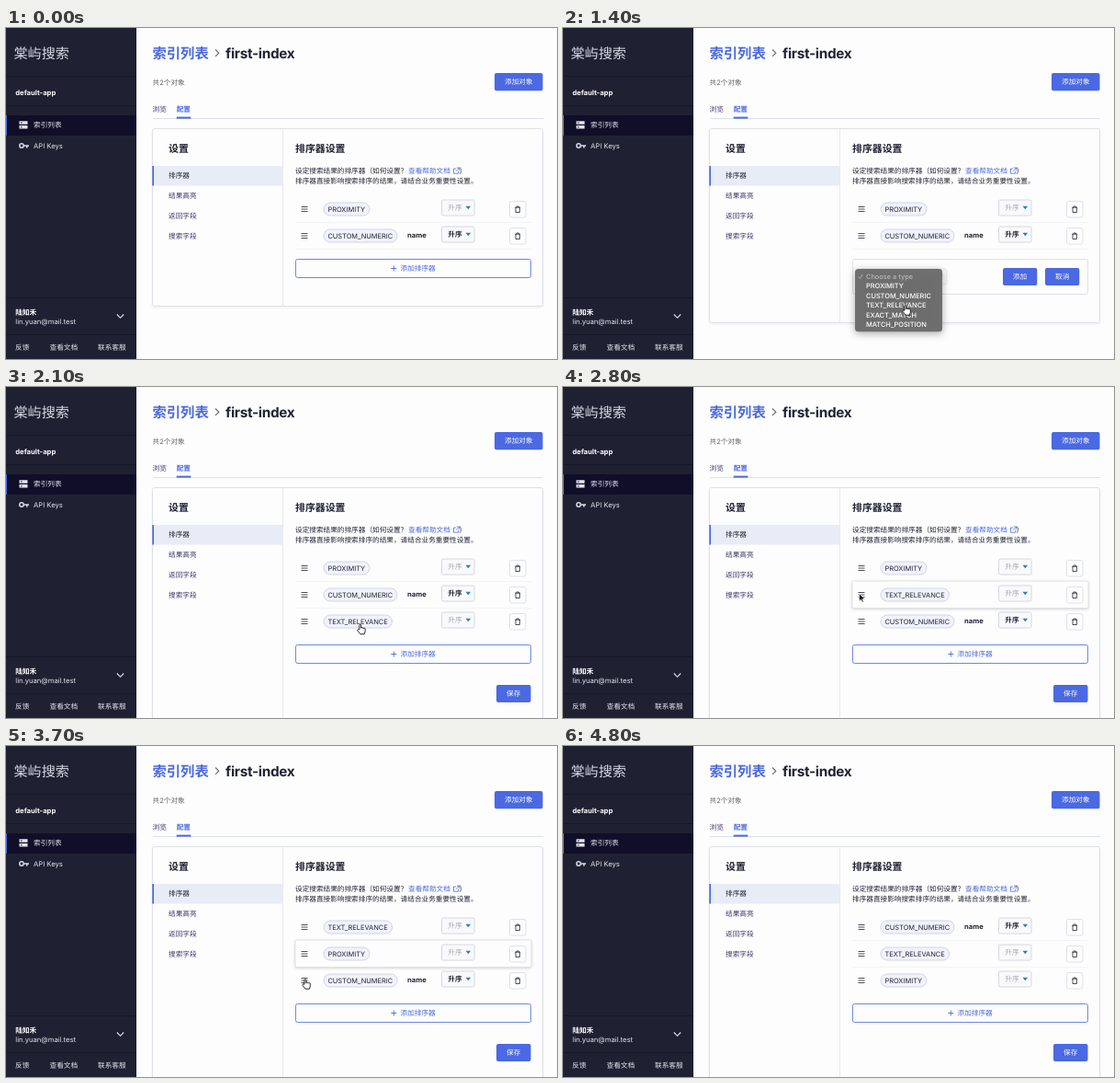
These frames come from a looping animation (600x360 px, 4.9 s). An HTML page:

```html
<!DOCTYPE html>
<html lang="zh-CN">
<head>
<meta charset="utf-8">
<title>排序器设置</title>
<style>
  html, body { margin: 0; width: 100%; height: 100%; overflow: hidden; background: #fdfdfd; }
  svg { display: block; width: 600px; height: 360px; }
  text {
    font: 7.65px Inter, "Noto Sans CJK SC", "Noto Sans CJK", sans-serif;
    fill: #202233; text-rendering: geometricPrecision; white-space: pre;
  }
  .side text { fill: #e4e5ec; }
  .side .brand { font-size: 15.1px; font-weight: 500; fill: #d6d8e2; }
  .b, .side .b { font-weight: 700; }
  .side .b { fill: #fff; }
  .h1 { font-size: 15.3px; font-weight: 700; }
  .h1.en { letter-spacing: -.3px; }
  .h2 { font-size: 10.9px; font-weight: 600; }
  .blue { fill: #4a69e2; }
  .indigo { fill: #3c366b; }
  .grey { fill: #666; }
  .btn rect { fill: #4a69e2; }
  .btn text { fill: #fff; font-weight: 500; text-anchor: middle; }
  .box { fill: #fdfdfd; stroke: #dfe1e9; }
  .field { fill: #f9f9fb; stroke: #d6d8e1; }
  .line { fill: none; stroke: #202233; stroke-width: .8; }
  .pill { fill: #f1f2fb; stroke: #c8cbe2; stroke-width: .8; }
  .tri { fill: #2d7fb8; }
  .off { fill: #a4a6ae; }
  .card { filter: drop-shadow(0 1px 1px rgba(40, 45, 80, .08)); }
  .lift { fill: #fdfdfd; stroke: #dcdde3; stroke-width: .8; filter: drop-shadow(0 1px 1.5px rgba(0, 0, 0, .16)); }
  .menu { filter: drop-shadow(0 2px 4px rgba(0, 0, 0, .35)); }
  .menu text { font-size: 7.4px; font-weight: 500; fill: #fff; }
  .menu .off { fill: #b8b8b8; }
</style>
</head>
<body>
<svg viewBox="0 0 600 360">
  <g class="side">
    <rect width="142" height="360" fill="#1f2132"/>
    <path d="M0 52.5H142M0 84.5H142M0 293.5H142M0 333.5H142" stroke="#171929"/>
    <rect y="95" width="142" height="22" fill="#100e29"/>
    <rect y="95" width="1" height="22" fill="#4a69e2"/>
    <text class="brand" x="8.5" y="32.7">棠屿搜索</text>
    <text class="b" x="10.3" y="72.8">default-app</text>
    <path d="M14.500 101.200h9v3.600h-9zM14.500 106h9v3.600h-9z" fill="#e4e5ec"/>
    <path d="M16 103h1.500M16 107.800h1.500" stroke="#100e29"/>
    <text x="30" y="108.4">索引列表</text>
    <circle cx="17" cy="128" r="2.2" fill="none" stroke="#d7d9e3" stroke-width="1.5"/>
    <path d="M19.5 128H25M22.8 128v2.6" fill="none" stroke="#d7d9e3" stroke-width="1.6"/>
    <text x="30" y="130.8">API Keys</text>
    <text class="b" x="10.3" y="312">陆知禾</text>
    <text x="10.3" y="322.4">lin.yuan@mail.test</text>
    <path d="M120.8 311.5l3.7 3.8 3.7-3.8" fill="none" stroke="#e4e5ec" stroke-width="1.1"/>
    <text x="10" y="350.4">反馈</text>
    <text x="47.5" y="350.4">查看文档</text>
    <text x="100" y="350.4">联系客服</text>
  </g>

  <text class="h1 blue" x="159.5" y="33.2">索引列表</text>
  <path d="M228 23.5l3.8 3.7-3.8 3.7" fill="none" stroke="#666" stroke-width="1.1"/>
  <text class="h1 en" x="239" y="33">first-index</text>
  <text class="grey" x="159.5" y="61.9">共2个对象</text>
  <g class="btn"><rect x="532" y="49" width="52.5" height="19.3" rx="2"/><text x="558.3" y="61.4">添加对象</text></g>
  <text class="indigo" x="159.5" y="91">浏览</text>
  <text class="b blue" x="185.7" y="91">配置</text>
  <path d="M160 98.5H585" stroke="#dfe1e9"/>
  <rect class="blue" x="185.7" y="96.6" width="15.6" height="2"/>

  <g class="card"><rect id="card" class="box" x="159.5" y="109.5" width="425" rx="2"/></g>
  <rect id="divider" x="301" y="110" width="1" fill="#e8eaf0"/>
  <rect x="160" y="150" width="141" height="21.5" fill="#e8ecf7"/>
  <rect class="blue" x="159.3" y="150" width="1.7" height="21.5"/>
  <text class="h2" x="177" y="135.2">设置</text>
  <text x="177" y="163.4">排序器</text>
  <text class="indigo" x="177" y="185.4">结果高亮</text>
  <text class="indigo" x="177" y="207.4">返回字段</text>
  <text class="indigo" x="177" y="229.2">搜索字段</text>

  <text class="h2" x="315" y="135.2">排序器设置</text>
  <text x="315" y="158">设定搜索结果的排序器（如何设置？<tspan class="blue" x="438">查看帮助文档</tspan><tspan x="493.5">）</tspan></text>
  <path d="M490 153h-2.500v5.200h5.200v-2.500M490.800 152h2.900v2.900M493.500 152.200l-3.600 3.600" fill="none" stroke="#4a69e2" stroke-width=".8"/>
  <text x="315" y="168.7">排序器直接影响搜索排序的结果，请结合业务重要性设置。</text>
  <path d="M315 211.5H572M315 240.5H572" stroke="#f2f3f6"/>

  <g id="add">
    <rect x="315.5" y="251.5" width="256" height="20" rx="2" fill="#fdfdfd" stroke="#4a69e2" stroke-width=".8"/>
    <path d="M419.3 261.5h6M422.3 258.5v6" stroke="#4a69e2" stroke-width=".9"/>
    <text class="blue" x="429.5" y="264.2">添加排序器</text>
  </g>
  <g id="form">
    <rect class="box" x="315.5" y="251.5" width="256" height="38" rx="2"/>
    <g id="picker">
      <rect class="field" x="324.5" y="262" width="93.3" height="17" rx="1.5"/>
      <text id="choice" x="331" y="273.1"></text>
      <path class="tri" d="M408 268.4h6l-3 3.7z"/>
    </g>
    <g class="btn"><rect x="479" y="261" width="37.3" height="19" rx="2"/><text x="497.5" y="273.3">添加</text></g>
    <g class="btn"><rect x="525" y="261" width="37.3" height="19" rx="2"/><text x="543.7" y="273.3">取消</text></g>
  </g>
  <g id="save" class="btn"><rect x="534" y="324" width="37.5" height="19" rx="2"/><text x="552.7" y="336.3">保存</text></g>
  <g id="rows"></g>
  <g id="menu" class="menu">
    <rect x="318" y="262" width="95" height="68.3" rx="3.5" fill="#6c6c6c" fill-opacity=".97"/>
    <path d="M321.8 270.5l1.7 2 2.7-4.700" fill="none" stroke="#b8b8b8" stroke-width=".9"/>
  </g>
  <g id="cursor">
    <path id="hand" d="M3 6.2V1.6a.9.9 0 0 1 1.8 0V4.6a.8.8 0 0 1 1.6.2a.8.8 0 0 1 1.5.3a.75.75 0 0 1 1.4.5V8.2L8.4 11.2H4L1 7.4a.9.9 0 0 1 1.3-1.2z" fill="#fff" stroke="#111" stroke-width=".9" stroke-linejoin="round"/>
    <path id="arrow" d="M.5.5V9l2-1.8 1.3 3 1.5-.7L4 6.7h2.7z" fill="#111" stroke="#fff" stroke-width=".7"/>
  </g>
</svg>
<script>
const LOOP = 4900, STEP = 100, PITCH = 29, TOP = 197;
const $ = id => document.getElementById(id);
const show = (el, on) => el.setAttribute('visibility', on ? 'inherit' : 'hidden');
const move = (el, x, y) => el.setAttribute('transform', `translate(${x} ${y})`);
const within = (t, from, to) => t >= from && t < to;
const clamp = v => Math.min(1, Math.max(0, v));
const ease = (t, from, to) => {
  const p = clamp((t - from) / (to - from));
  return p * p * (3 - 2 * p);
};

const rows = [
  { name: 'PROXIMITY', width: 50 },
  { name: 'CUSTOM_NUMERIC', width: 80, field: 'name' },
  { name: 'TEXT_RELEVANCE', width: 74.5 }
];
const [proximity, custom, relevance] = rows;

const drags = [
  { row: relevance, from: 2, to: 1, start: 2400, end: 2800, drop: 2900 },
  { row: proximity, from: 0, to: 1, start: 3000, end: 3500, drop: 3800 },
  { row: custom, from: 2, to: 0, start: 3800, end: 4300, drop: 4400 }
];

const grip = slot => ({ x: 322, y: 195 + PITCH * slot });
const hops = [
  { start: 100, end: 200, x: 442, y: 265 },
  { start: 400, end: 900, x: 371, y: 266 },
  { start: 1000, end: 1300, x: 369, y: 301 },
  { start: 1400, end: 1700, x: 492, y: 266 },
  { start: 1800, end: 2300, ...grip(2) },
  { start: 2400, end: 2800, ...grip(1) },
  { start: 2800, end: 3000, ...grip(0) },
  { start: 3000, end: 3700, ...grip(2) },
  { start: 3800, end: 4300, ...grip(0) }
];

function cursorAt(t) {
  const pos = { x: 452, y: 288 };
  for (const { start, end, x, y } of hops) {
    const p = ease(t, start, end);
    pos.x += (x - pos.x) * p;
    pos.y += (y - pos.y) * p;
  }
  return pos;
}

// Each passed row gives way by one slot towards where the dragged row began
function slotsAt(t) {
  const slots = new Map(rows.map((row, i) => [row, i]));
  for (const { row, from, to, start, end } of drags) {
    if (t <= start) break;
    const dir = Math.sign(to - from), travel = Math.abs(to - from) * ease(t, start, end);
    for (const [other, slot] of slots) {
      const gap = (slot - from) * dir;
      if (gap > 0) slots.set(other, slot - dir * clamp(travel - gap + 1));
    }
    slots.set(row, from + dir * travel);
  }
  return slots;
}

for (const row of rows) {
  const g = row.el = document.createElementNS('http://www.w3.org/2000/svg', 'g');
  g.innerHTML = `
    <rect class="lift" x="315" y="-15" width="257" height="29.5" rx="1.5"/>
    <path class="line" d="M321.5 -2.5h7M321.5 0h7M321.5 2.5h7"/>
    <rect class="pill" x="346" y="-7" width="${row.width}" height="14" rx="7"/>
    <text x="350.4" y="2.8" style="font-size:7.45px">${row.name}</text>
    <text class="b" x="437" y="2.4">${row.field || ''}</text>
    <rect class="field" x="474.5" y="-10" width="35.5" height="17" rx="1.5"/>
    <text class="${row.field ? 'b' : 'off'}" x="481.3" y="1.3">升序</text>
    <path class="tri" d="M500.5 -3.3h5.6l-2.8 3.6z"/>
    <rect class="box" x="548.5" y="-8.5" width="17.5" height="17.5" rx="2"/>
    <path class="line" d="M554.2 -1.8h6M556 -1.8v-1.2h2.4v1.200M555 -1.8v5.300h4.400v-5.300"/>`;
  $('rows').append(g);
}

['Choose a type', 'PROXIMITY', 'CUSTOM_NUMERIC', 'TEXT_RELEVANCE', 'EXACT_MATCH', 'MATCH_POSITION'].forEach((label, i) => {
  $('menu').insertAdjacentHTML('beforeend', `<text class="${i ? '' : 'off'}" x="330" y="${272.8 + i * 10.45}">${label}</text>`);
});

function draw(t) {
  const added = t >= 1800, editing = within(t, 400, 1800), open = within(t, 1100, 1500);
  const height = added ? 260 : editing ? 211 : 193;
  $('card').setAttribute('height', height);
  $('divider').setAttribute('height', height);
  show($('add'), !editing);
  move($('add'), 0, added ? PITCH : 0);
  show($('form'), editing);
  show($('save'), added);
  show($('menu'), open);
  $('picker').setAttribute('opacity', open ? .5 : 1);
  $('choice').textContent = t < 1500 ? 'Choose a type' : 'TEXT_RELEVANCE';

  const held = drags.find(d => within(t, d.start + STEP, d.drop));
  for (const [row, slot] of slotsAt(t)) {
    const visible = added || row !== relevance, lifted = held?.row === row;
    show(row.el, visible);
    move(row.el, 0, TOP + PITCH * slot);
    show(row.el.firstElementChild, visible && lifted);
    if (lifted && row.el.nextSibling) $('rows').append(row.el);
  }

  const arrow = t < 200 || within(t, 2700, 2900), { x, y } = cursorAt(t);
  move($('cursor'), x, y);
  show($('cursor'), within(t, 100, 4700));
  show($('arrow'), arrow);
  show($('hand'), !arrow);
}

function tick() {
  draw(Math.floor(performance.now() % LOOP / STEP) * STEP);
  requestAnimationFrame(tick);
}
tick();
</script>
</body>
</html>
```
